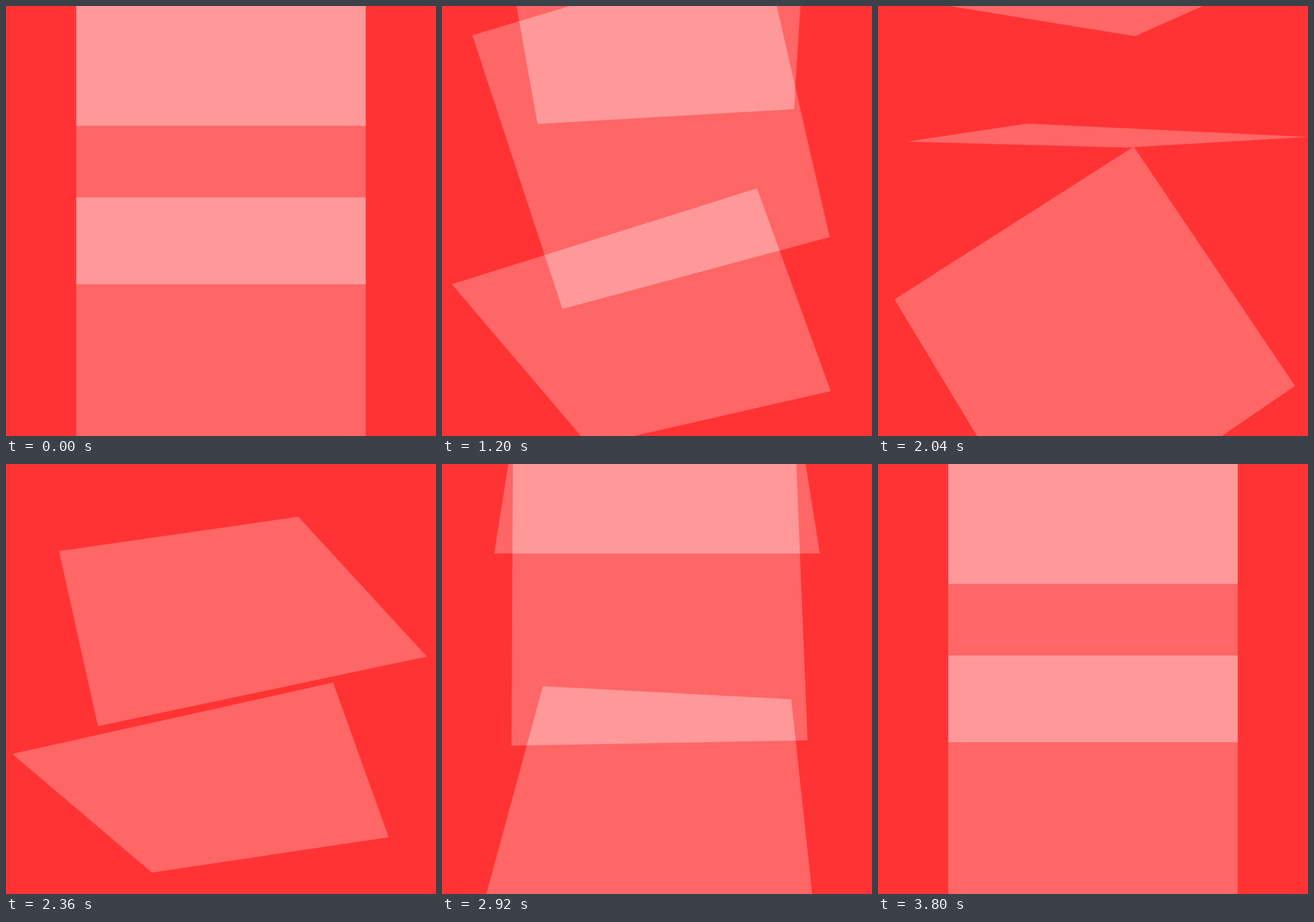
Animation of 748 by 748 pixels, one loop 3.84 s. Source, as an HTML page with a canvas:

```html
<!DOCTYPE html>
<html lang="en">
<head>
<meta charset="utf-8">
<title>Turning squares</title>
<style>
  html, body { margin: 0; width: 100%; height: 100%; overflow: hidden; background: #f33; }
  canvas { display: block; }
</style>
</head>
<body>
<canvas width="748" height="748"></canvas>
<script>
const LOOP = 3840, STEP = 40;
const MID = 374, HALF = 251.75, DEPTH = 1050;
const CORNERS = [[-1, -1], [1, -1], [1, 1], [-1, 1]];

// Centre height; each turn has an angle in degrees, a start and an end in ms.
const squares = [
  { y: -43.25, tilt: [-180, 240, 3800], spin: [-90, 1000, 2680] },
  { y: 232.25, tilt: [-180, 840, 3160], spin: [-90, 520, 3080] },
  { y: 584.75, tilt: [-360, 600, 3560], spin: [-90, 200, 3320] }
];

const ctx = document.querySelector('canvas').getContext('2d');

function angleAt(t, [degrees, start, end]) {
  const x = Math.min(1, Math.max(0, (t - start) / (end - start)));
  return degrees * Math.PI / 180 * x * x * (3 - 2 * x);
}

// Spin in the plane, tilt about the horizontal axis, then project from the stage centre.
function drawSquare(t, { y, tilt, spin }) {
  const a = angleAt(t, tilt), b = angleAt(t, spin);
  ctx.beginPath();
  for (const [sx, sy] of CORNERS) {
    const px = HALF * (sx * Math.cos(b) - sy * Math.sin(b));
    const py = HALF * (sx * Math.sin(b) + sy * Math.cos(b));
    const scale = DEPTH / (DEPTH - py * Math.sin(a));
    ctx.lineTo(MID + px * scale, MID + (y - MID + py * Math.cos(a)) * scale);
  }
  ctx.fill();
}

function draw(t) {
  ctx.globalCompositeOperation = 'source-over';
  ctx.fillStyle = '#f33';
  ctx.fillRect(0, 0, 748, 748);
  ctx.globalCompositeOperation = 'lighter';
  ctx.fillStyle = '#033';
  squares.forEach(square => drawSquare(t, square));
}

const begin = performance.now();
function tick() {
  const t = (performance.now() - begin) % LOOP;
  draw(Math.floor((t + 4) / STEP) * STEP);   // 25 pictures per second
  requestAnimationFrame(tick);
}
tick();
</script>
</body>
</html>
```
